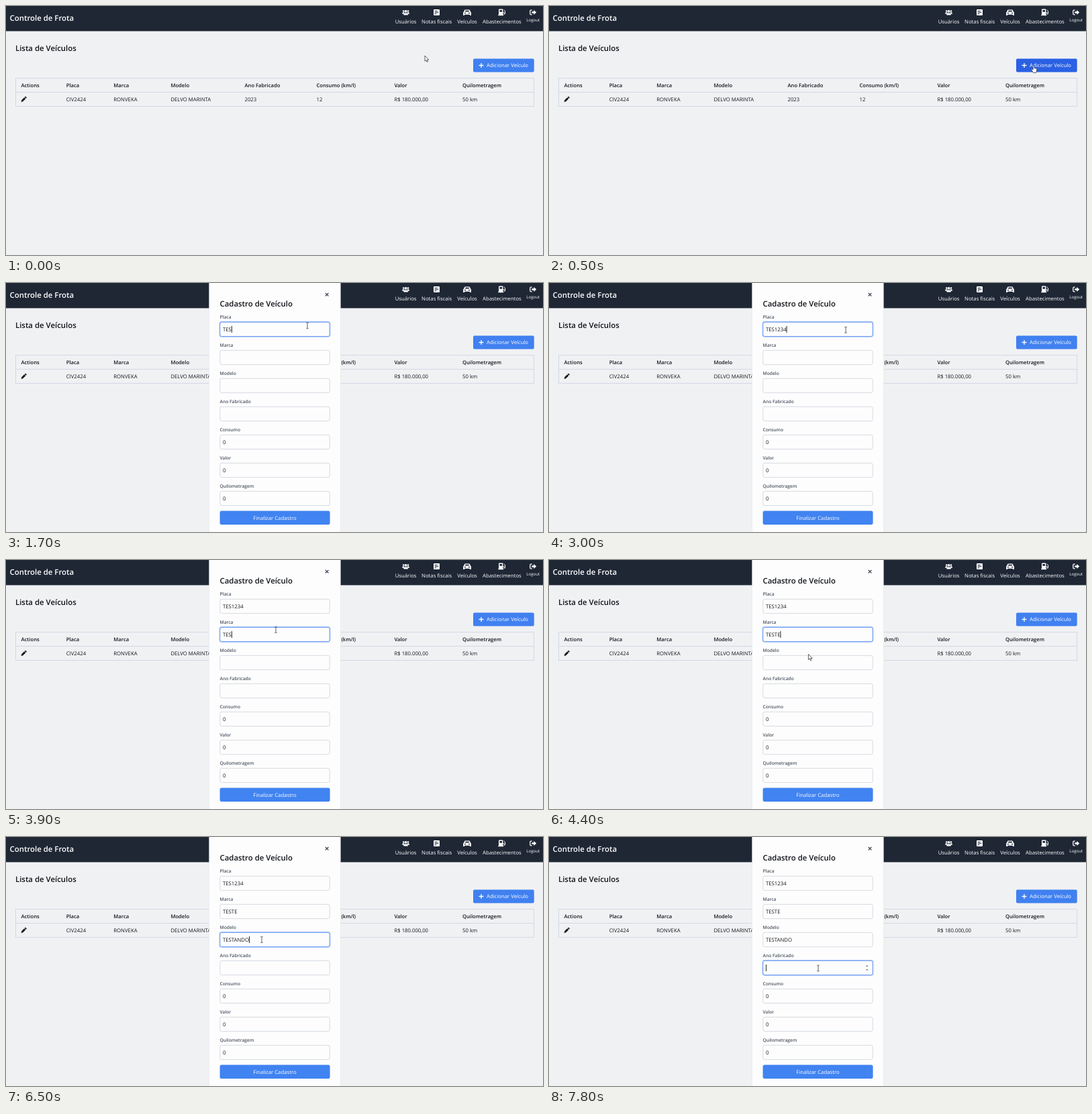
An HTML page for the animation above (8 s loop, 800 px wide and 371 px high).

```html
<!DOCTYPE html>
<html lang="pt-BR">
<head>
<meta charset="utf-8">
<title>Controle de Frota</title>
<style>
  html, body { margin: 0; width: 100%; height: 100%; overflow: hidden; background: #f0f1f3; }
  svg { display: block; width: 800px; height: 371px; }
  text { font: 7.75px "Open Sans", "Noto Sans", sans-serif; fill: #15181e; text-rendering: geometricPrecision; white-space: pre; }
  .title { font-size: 11.4px; font-weight: 600; fill: #101318; }
  .head { font-size: 7.65px; font-weight: 600; }
  .label { font-size: 6.7px; font-weight: 600; fill: #4a5361; }
  .light { fill: #fff; }
  .mid { text-anchor: middle; }
  .box { fill: #fdfdfd; stroke: #d5dae2; }
  .ring { fill: none; stroke: #a9c5f8; stroke-width: 2.4; visibility: hidden; }
  .focus .ring { visibility: visible; }
  .focus .box { stroke: #6b9cf3; }
</style>
</head>
<body>
<svg id="stage" viewBox="0 0 800 371" xmlns="http://www.w3.org/2000/svg">
  <rect width="800" height="371" fill="#f0f1f3"/>
  <rect width="800" height="37.5" fill="#1f2735"/>
  <g id="page"></g>

  <g fill="#fff">
    <g id="users">
      <circle cx="592.2" cy="7.5" r="1.3"/><circle cx="599" cy="7.5" r="1.3"/><circle cx="595.6" cy="7.8" r="1.9"/>
      <path d="M590.3 11.8v-1q0-1.5 1.5-1.5h1.2q.7 0 1 .4-1.300 .7-1.500 2.100zM600.900 11.800v-1q0-1.500-1.500-1.500h-1.200q-.7 0-1 .4 1.300 .7 1.500 2.100zM592.400 13.600v-1.100q0-2 2-2h2.400q2 0 2 2v1.100z"/>
    </g>
    <g id="invoice">
      <rect x="637" y="5" width="9" height="9" rx="1.1"/>
      <path d="M638.700 7.500h4M638.700 9.600h5.600M638.700 11.700h2.600" stroke="#1f2735" stroke-width="1"/>
    </g>
    <g id="car">
      <path fill-rule="evenodd" d="M684.200 5.500h5.600q.9 0 1.200.8l.9 2.200q1 .4 1 1.500v3.400q0 .6-.6.600h-.8q-.6 0-.6-.6v-.7h-7.800v.7q0 .6-.6.600h-.8q-.6 0-.6-.6V10q0-1.100 1-1.500l.9-2.200q.3-.8 1.200-.8zM684.500 6.800l-.7 1.600h6.400l-.7-1.600z"/>
      <path d="M683.300 10.600h1.400M689.300 10.600h1.400" stroke="#1f2735" stroke-width="1.200" stroke-linecap="round"/>
    </g>
    <g id="pump">
      <path fill-rule="evenodd" d="M735 4.600h4.400q1 0 1 1v7.200h.7v1.400h-7.800v-1.400h.7V5.600q0-1 1-1zM735.400 6v2.700h3.600V6z"/>
      <path d="M740.400 9.400h.7q.8 0 .8.800v1.300q0 .8.800.8t.8-.8V7.600l-1.900-1.900" fill="none" stroke="#fff"/>
    </g>
    <g id="logout">
      <path d="M783.700 6.200h-1.600q-1.300 0-1.300 1.300v4q0 1.300 1.300 1.300h1.600" fill="none" stroke="#fff" stroke-width="1.300"/>
      <path d="M783.300 8.200h3V6l3.900 3.500-3.900 3.500v-2.200h-3z"/>
    </g>
  </g>

  <g fill="none" stroke="#d2d9e5">
    <rect x="14.500" y="107.500" width="772" height="42"/>
    <path d="M14 128.500h773"/>
  </g>
  <path d="M22.600 142.900l.6-2.600 4-4 2 2-4 4zM27.700 135.800l.8-.8q.5-.5 1 0l1 1q.5.5 0 1l-.8.8z" fill="#111"/>

  <rect id="add" x="696" y="78.500" width="90.700" height="20" rx="2"/>
  <path d="M708 85v7M704.500 88.500h7" stroke="#fff" stroke-width="1.300"/>
  <text class="light" x="716" y="91.300">Adicionar Veículo</text>

  <g id="modal">
    <rect x="302" y="-4" width="197" height="380" fill="#d9dce2" opacity=".5"/>
    <rect x="302.700" y="-4" width="195.600" height="380" fill="#fdfdfd"/>
    <path d="M475.800 15l4.600 4.600M480.400 15l-4.600 4.600" stroke="#4b5563" stroke-width="1.400"/>
    <text class="title" x="318.500" y="34.600">Cadastro de Veículo</text>
    <g id="form"></g>
    <path id="spin" d="M472 193l1.800-2.200 1.800 2.200zM472 197l1.800 2.200 1.800-2.200z" fill="#7b8088"/>
    <path id="caret" d="M0 0v10" stroke="#111" stroke-width=".9"/>
    <rect x="318.600" y="339.400" width="164" height="20.600" rx="2.500" fill="#4083f1"/>
    <text class="light mid" x="400.400" y="352.700">Finalizar Cadastro</text>
  </g>

  <g id="cursor">
    <path id="arrow" d="M0 0v8.200l1.900-1.700 1.300 3 1.300-.6-1.300-2.800h2.600z" fill="#fff" stroke="#222" stroke-width=".7"/>
    <path id="hand" d="M-.9.700q.9-1.300 1.800 0v3.600l3 .8q1 .3.900 1.500l-.6 3.200-.7 1.700h-4L-3 7.600q-.7-1.100.3-1.500.8-.2 1.800 1z" fill="#fff" stroke="#222" stroke-width=".7"/>
    <path id="beam" d="M-1.800-4.300h1.200l.6.500.6-.5h1.200M0-3.800v7.600M-1.800 4.300h1.200l.6-.5.6.5h1.200" fill="none" stroke="#333" stroke-width=".8"/>
  </g>
</svg>
<script>
const LOOP = 8000, STEP = 100, OPEN = 600, PITCH = 42;
const $ = id => document.getElementById(id);

function add(parent, tag, attrs, content = "") {
  const el = document.createElementNS("http://www.w3.org/2000/svg", tag);
  for (const key in attrs) el.setAttribute(key, attrs[key]);
  el.textContent = content;
  return parent.appendChild(el);
}
const write = (parent, x, y, content, cls = "") => add(parent, "text", { x, y, class: cls }, content);

// Static page text
const page = $("page");
write(page, 5.5, 21.800, "Controle de Frota", "title light");
write(page, 14, 66.800, "Lista de Veículos", "title");
[["Usuários", 595.600], ["Notas fiscais", 641.700], ["Veículos", 687], ["Abastecimentos", 738.900]]
  .forEach(([name, x]) => write(page, x, 26, name, "light mid"));
write(page, 785.200, 23.300, "Logout", "light mid").style.fontSize = "6.1px";
[
  [22.500, "Actions", ""],
  [89.700, "Placa", "CIV2424"],
  [160.300, "Marca", "RONVEKA"],
  [245.400, "Modelo", "DELVO MARINTA"],
  [355.500, "Ano Fabricado", "2023"],
  [462.500, "Consumo (km/l)", "12"],
  [578.400, "Valor", "R$ 180.000,00"],
  [680, "Quilometragem", "50 km"]
].forEach(([x, head, cell]) => {
  write(page, x, 120.700, head, "head");
  write(page, x, 141.700, cell);
});

// Form fields
const defaults = ["", "", "", "", "0", "0", "0"];
const fields = ["Placa", "Marca", "Modelo", "Ano Fabricado", "Consumo", "Valor", "Quilometragem"]
  .map((name, i) => {
    const y = 58.300 + i * PITCH;
    const g = add($("form"), "g", {});
    const rect = cls => add(g, "rect", { x: 318.800, y, width: 163.400, height: 21.300, rx: 2.600, class: cls });
    write(g, 318.500, y - 4.900, name, "label");
    rect("ring");
    rect("box");
    return { g, y, text: write(g, 323, y + 13.600, defaults[i]) };
  });

// time, focused field, its text, caret shown
const typing = [
  [1200, 0, "", 1], [1400, 0, "T", 1], [1700, 0, "TES", 1], [2200, 0, "TES", 0],
  [2600, 0, "TES12", 1], [2900, 0, "TES1234", 1],
  [3300, 1, "", 1], [3600, 1, "T", 1], [3900, 1, "TES", 1], [4000, 1, "TEST", 1], [4200, 1, "TESTE", 1],
  [4500, 2, "", 1], [5000, 2, "", 0], [5500, 2, "TES", 1], [5700, 2, "TEST", 1], [5900, 2, "TESTA", 1],
  [6100, 2, "TESTAN", 1], [6200, 2, "TESTAND", 1], [6400, 2, "TESTANDO", 1], [7000, 2, "TESTANDO", 0],
  [7500, 3, "", 1]
];

// time, pointer x, y
const moves = [
  [0, 624, 74], [400, 722, 88], [700, 722, 88], [1200, 449, 63.500],
  [2900, 449, 63.500], [3300, 405, 104.500], [3600, 402, 104], [4200, 402, 104],
  [4500, 381, 153], [7200, 381, 153], [7600, 401, 195.500], [LOOP, 401, 195.500]
];

function pointerAt(t) {
  const i = moves.findIndex(m => m[0] > t);
  const [t0, x0, y0] = moves[i - 1], [t1, x1, y1] = moves[i];
  const p = (t - t0) / (t1 - t0), k = p * p * (3 - 2 * p);
  return [x0 + (x1 - x0) * k, y0 + (y1 - y0) * k];
}

const show = (id, on) => $(id).style.display = on ? "" : "none";

function render(now) {
  const t = Math.floor(now % LOOP / STEP) * STEP;
  const [x, y] = pointerAt(t);
  const open = t >= OPEN;
  const hover = x > 696 && x < 787 && y > 78 && y < 99;
  const beam = open && x > 318 && x < 483 && fields.some(f => y > f.y && y < f.y + 21.500);

  show("modal", open);
  $("add").setAttribute("fill", hover ? "#2a60e3" : "#4080f0");
  $("cursor").setAttribute("transform", `translate(${x} ${y})`);
  show("hand", hover);
  show("beam", beam);
  show("arrow", !hover && !beam);

  const done = typing.filter(s => s[0] <= t);
  const active = done[done.length - 1];
  fields.forEach((f, i) => {
    const last = done.filter(s => s[1] === i).pop();
    f.text.textContent = last ? last[2] : defaults[i];
    f.g.setAttribute("class", active && active[1] === i ? "focus" : "");
  });
  show("spin", active && active[1] === 3);
  show("caret", active && active[3]);
  if (active) {
    const f = fields[active[1]];
    const end = active[2] ? f.text.getComputedTextLength() : 0;
    $("caret").setAttribute("transform", `translate(${323.500 + end} ${f.y + 5.700})`);
  }
}

const start = performance.now();
function tick() {
  render(performance.now() - start);
  requestAnimationFrame(tick);
}
tick();
</script>
</body>
</html>
```
